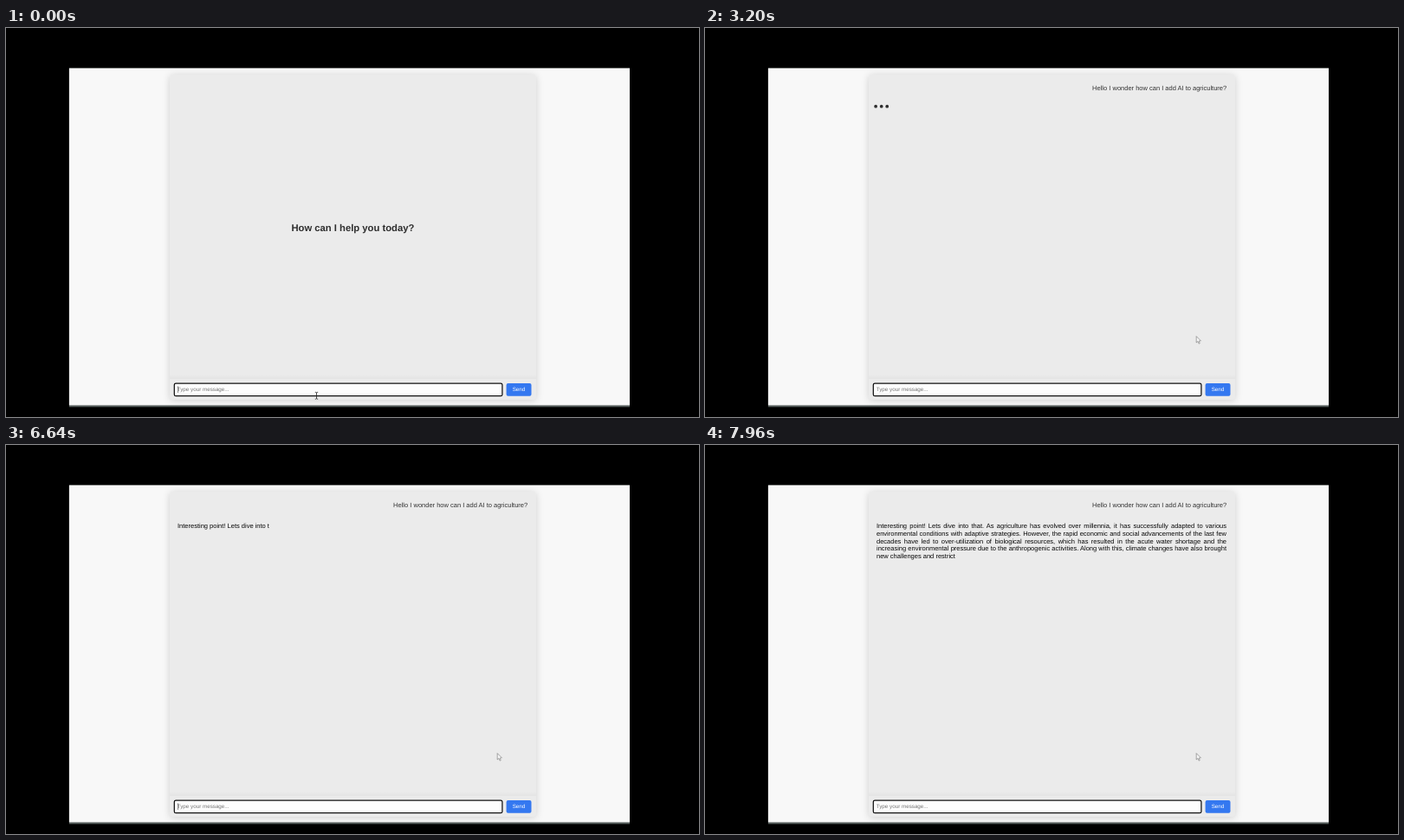
Animation of 800 by 450 pixels, one loop 8000 ms. Source, as an HTML page:

```html
<!DOCTYPE html>
<html lang="en">
<head>
<meta charset="utf-8">
<title>Chat</title>
<style>
  html, body { margin: 0; width: 100%; height: 100%; overflow: hidden; background: #000; }
  #stage { position: relative; width: 800px; height: 450px; overflow: hidden; background: #000;
    font: 7.5px/8.75px "Liberation Sans", Arial, sans-serif; text-rendering: geometricPrecision; }
  svg { position: absolute; left: 0; top: 0; width: 800px; height: 450px; }
  /* the tiny turn keeps baselines from snapping to whole pixels */
  #copy, #answer { transform: rotate(.01deg); transform-origin: 50% 50%; }
  #copy { transform-origin: 400px 225px; }
  #answer { position: absolute; left: 198.2px; top: 89.85px; width: 404px; color: #080808;
    text-align: justify; }
  #panel { filter: drop-shadow(0 1px 4px rgba(0,0,0,.16)); }
  #title { font-size: 11.25px; font-weight: bold; }
  .small { font-size: 6.25px; }
</style>
</head>
<body>
<div id="stage">
  <svg viewBox="0 0 800 450">
    <defs>
      <linearGradient id="shade" x1="0" y1="0" x2="0" y2="1">
        <stop offset="0" stop-opacity="0"/><stop offset="1" stop-opacity=".03"/>
      </linearGradient>
    </defs>
    <rect x="72.9" y="46.5" width="647.1" height="391.9" fill="#59615f"/>
    <rect x="72.9" y="46.5" width="647.1" height="389.9" fill="#f8f8f8"/>
    <rect id="panel" x="189" y="54" width="423" height="376" rx="4" fill="#ebebeb"/>
    <rect x="189" y="401" width="423" height="5" fill="url(#shade)"/>
    <rect x="194.3" y="411" width="378.6" height="14.7" rx="1.8" fill="#fdfdfd"
      stroke="#101010" stroke-width="1.25"/>
    <rect x="577.6" y="410.9" width="28.9" height="14.8" rx="2" fill="#3478f0"/>
    <g id="dots" fill="#2e2e2e">
      <circle cx="197.1" cy="90.7" r="1.88"/>
      <circle cx="203.7" cy="90.7" r="1.88"/>
      <circle cx="210.2" cy="90.7" r="1.88"/>
    </g>
    <g id="copy">
      <text id="title" x="400.4" y="235" text-anchor="middle" fill="#2e2e2e">How can I help you today?</text>
      <text id="question" x="602.2" y="71.6" text-anchor="end" fill="#333"></text>
      <text id="entry" class="small" x="197.8" y="420.4"></text>
      <text class="small" x="592" y="420.4" text-anchor="middle" fill="#fff">Send</text>
    </g>
    <rect id="caret" y="414.4" width=".5" height="7.6" fill="#222"/>
  </svg>
  <div id="answer"></div>
  <svg viewBox="0 0 800 450">
    <path id="beam" d="M356.8 421.4h1.1l.6.5.6-.5h1.1M358.5 421.8v7M356.8 429.2h1.1l.6-.5.6.5h1.1"
      fill="none" stroke="#222" stroke-width=".8"/>
    <path id="arrow" d="M0 0V7.4L1.7 5.9 2.9 8.6 4 8.1 2.9 5.5 5.2 5.3Z"
      fill="#f6f6f6" stroke="#666" stroke-width=".55"/>
  </svg>
</div>
<script>
  const LOOP = 8000, PASTE = 40, SENT = 1480, REPLY = 6541;
  const MS_PER_CHAR = 2.8, CARET_HALF = 178.67;
  const PULSE = 667, PULSE_START = 1513, PULSE_RISE = 222;
  const QUESTION = 'Hello I wonder how can I add AI to agriculture?';
  const ANSWER = 'Interesting point! Lets dive into that. As agriculture has evolved over millennia, ' +
    'it has successfully adapted to various environmental conditions with adaptive strategies. ' +
    'However, the rapid economic and social advancements of the last few decades have led to ' +
    'over-utilization of biological resources, which has resulted in the acute water shortage and ' +
    'the increasing environmental pressure due to the anthropogenic activities. Along with this, ' +
    'climate changes have also brought new challenges and restrict';

  // [time, x, y] of the arrow pointer
  const POINTER = [[440, 430, 385], [480, 520, 341], [520, 570, 322], [560, 567.2, 356.6]];
  // times at which the caret flips while the question waits in the field
  const FLIPS = [720, 1000, 1160, 1320];

  const $ = id => document.getElementById(id);
  const show = (id, on) => { $(id).style.visibility = on ? 'visible' : 'hidden'; };
  const setText = (id, text) => { if ($(id).textContent !== text) $(id).textContent = text; };

  function caretOn(t) {
    if (t < SENT) return FLIPS.filter(f => t >= f).length % 2 === 0;
    return Math.abs(Math.floor((t - 3200) / CARET_HALF) % 2) === 1;
  }

  // rises, holds dark, then falls back
  function dotOpacity(t) {
    const phase = ((t - PULSE_START) % PULSE + PULSE) % PULSE;
    const edge = Math.min(phase, PULSE - phase);
    return 0.4 + 0.6 * Math.min(1, edge / PULSE_RISE);
  }

  function render(t) {
    const filled = t >= PASTE && t < SENT;
    setText('entry', filled ? QUESTION : 'Type your message...');
    $('entry').setAttribute('fill', filled ? '#111' : '#757575');
    $('caret').setAttribute('x', filled ? 327.2 : 198);
    show('caret', caretOn(t));

    show('title', t < SENT);
    setText('question', t >= SENT ? QUESTION : '');
    show('dots', t >= SENT && t < REPLY);
    $('dots').style.opacity = dotOpacity(t);
    setText('answer', ANSWER.slice(0, Math.max(0, Math.floor((t - REPLY) / MS_PER_CHAR))));

    const spot = POINTER.filter(p => t >= p[0]).pop();
    show('beam', !spot);
    show('arrow', !!spot);
    if (spot) $('arrow').setAttribute('transform', `translate(${spot[1]} ${spot[2]})`);
  }

  const start = performance.now();
  function tick() {
    render((performance.now() - start) % LOOP);
    requestAnimationFrame(tick);
  }
  tick();
</script>
</body>
</html>
```
